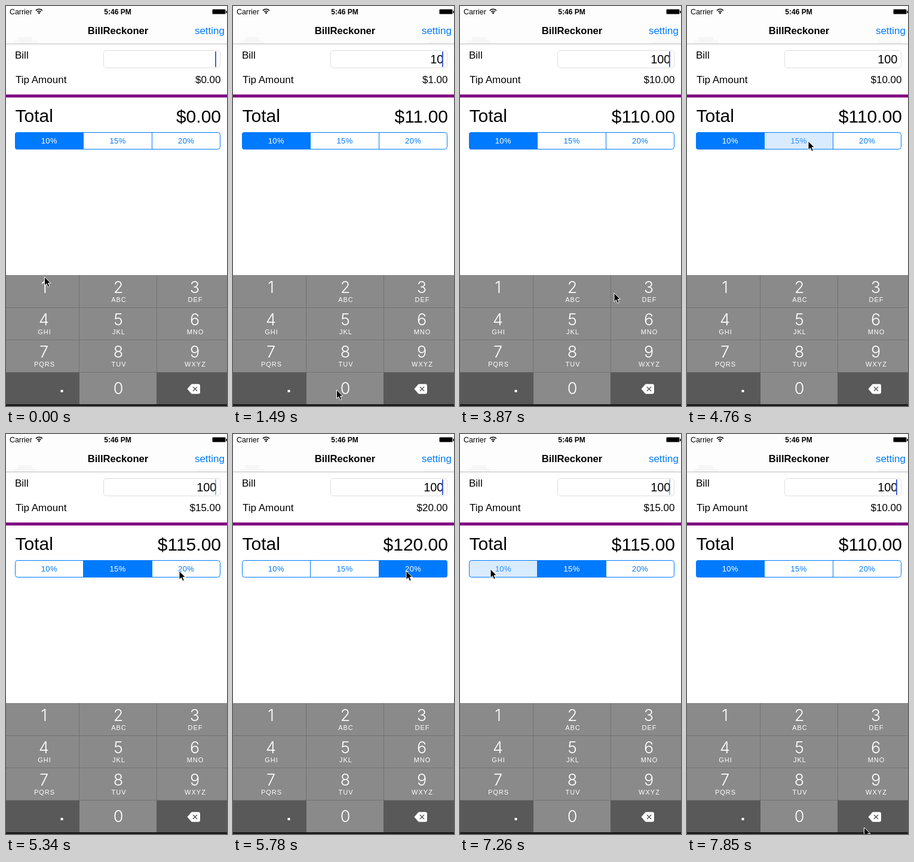
Write an HTML page that moves like this. It is 370 px wide and 669 px high and loops after 8 s.

```html
<!DOCTYPE html>
<html lang="en">
<head>
<meta charset="utf-8">
<title>Tip screen</title>
<style>
  html, body { margin: 0; width: 100%; height: 100%; overflow: hidden; background: #fff; }
  svg { display: block; width: 370px; height: 669px; }
  text { font-family: "Liberation Sans", Arial, sans-serif; font-size: 17px; }
  .mid { text-anchor: middle; }
  .end { text-anchor: end; }
  .big { font-size: 30px; }
  .bold { font-weight: bold; }
  .digit { font: 300 27px Inter, "Liberation Sans", sans-serif; fill: #fff; }
  .abc { font-size: 11px; letter-spacing: 1px; fill: #fff; }
  .seg { font-size: 13px; letter-spacing: .4px; }
</style>
</head>
<body>
<svg viewBox="0 0 370 669">
  <rect width="370" height="669" fill="#fff"/>
  <rect width="370" height="63" fill="#fdfdfd"/>
  <path d="M20 52h24v6h8v5H12v-5h8z" fill="#f6f6f6"/>
  <rect id="shade" y="59" height="4" fill="#f6f6f6"/>
  <path d="M0 63.5H370" stroke="#bcbcbc"/>

  <text x="6" y="13.5" style="font-size:12.4px">Carrier</text>
  <path d="M49.9 7.6a7.8 7.8 0 0 1 11 0M52.2 9.9a4.6 4.6 0 0 1 6.4 0" fill="none" stroke="#000" stroke-width="1.5"/>
  <path d="M55.4 13.6l-1.9-2.1a2.7 2.7 0 0 1 3.8 0z"/>
  <text class="mid bold" x="187" y="13.5" style="font-size:12px">5:46 PM</text>
  <rect x="345.5" y="5.5" width="22" height="8" rx="1.5" stroke="#888"/>
  <rect x="368.5" y="8" width="1.5" height="4"/>

  <text class="mid bold" x="187.5" y="47" style="font-size:16.6px">BillReckoner</text>
  <text class="end" x="366" y="47" fill="#007aff">setting</text>

  <text x="15" y="88">Bill</text>
  <rect x="163.5" y="74.5" width="195" height="29" rx="4.5" fill="#fff" stroke="#dedede"/>
  <text id="bill" class="end" x="352.5" y="96" style="font-size:20px"></text>
  <rect id="caret" x="350" y="76" width="2" height="26" fill="#4260e8"/>
  <text x="16" y="129">Tip Amount</text>
  <text id="tip" class="end" x="359.5" y="129"></text>
  <rect y="148" width="370" height="5" fill="#800080"/>
  <text class="big" x="15.5" y="194">Total</text>
  <text id="total" class="end big" x="360" y="195"></text>

  <clipPath id="round"><rect x="15" y="211" width="344" height="29" rx="4"/></clipPath>
  <g id="segs" clip-path="url(#round)"></g>
  <path d="M129.5 211V240M244.5 211V240" stroke="#007aff"/>
  <rect x="15.5" y="211.5" width="343" height="28" rx="4" fill="none" stroke="#007aff"/>
  <g id="labels"></g>

  <rect y="450" width="370" height="219" fill="#8a8a8a"/>
  <path d="M0 612H123V666H0zM252 612H370V666H252z" fill="#595959"/>
  <rect id="zero" x="123" y="612" width="129" height="54"/>
  <path d="M0 504.5H370M0 558.5H370M0 612.5H370M122.5 450V612M252.5 450V612" stroke="#727272"/>
  <rect y="666" width="370" height="3" fill="#1c1c1c"/>
  <g id="keys"></g>
  <rect x="91.5" y="642" width="4" height="4" fill="#fff"/>
  <path d="M303.5 640.5l6-7q1-1.2 2.5-1.2h10q3 0 3 3v10.5q0 3-3 3h-10q-1.5 0-2.5-1.2z" fill="#fff"/>
  <path d="M313 637l7 7m0-7l-7 7" stroke="#595959" stroke-width="1.5"/>

  <path id="mouse" d="M0 0V14.5L3.4 11.4L5.8 16.8L8.4 15.700L6 10.4H10.3z" stroke="#fff"/>
</svg>
<script>
const LOOP = 8000, STEP = 148.1;
const LAST = Math.floor(LOOP / STEP) - 1;
const BLINK = 6.6, BLINK_LEAD = .65;   // in steps
const $ = id => document.getElementById(id);

function set(el, attrs) {
  for (const name in attrs) el.setAttribute(name, attrs[name]);
  return el;
}

function add(parent, tag, attrs, text = '') {
  const el = set(document.createElementNS('http://www.w3.org/2000/svg', tag), attrs);
  el.textContent = text;
  $(parent).append(el);
  return el;
}

const columns = [63.5, 188, 316];
' ,ABC,DEF,GHI,JKL,MNO,PQRS,TUV,WXYZ'.split(',').forEach((letters, i) => {
  const x = columns[i % 3], y = 480 + 54 * Math.floor(i / 3);
  add('keys', 'text', { class: 'mid digit', x, y }, i + 1);
  add('keys', 'text', { class: 'mid abc', x: x + 1, y: y + 15 }, letters);
});
add('keys', 'text', { class: 'mid digit', x: columns[1], y: 649 }, 0);

const rates = [10, 15, 20];
const width = 344 / 3;
const segs = rates.map((rate, i) => {
  const x = 15 + width * i;
  return {
    fill: add('segs', 'rect', { x, y: 211, width, height: 29, fill: '#007aff' }),
    label: add('labels', 'text', { class: 'mid seg', x: x + width / 2, y: 230 }, rate + '%')
  };
});

// Steps at which each digit of the bill appears
const strokes = [3, 10, 13];
const picks = [
  { at: 0, seg: 0 }, { at: 33, seg: 1 }, { at: 38, seg: 2 }, { at: 44, seg: 1 }, { at: 50, seg: 0 }
];
const start = [64.5, 453];
const moves = [
  { from: 3, to: 7, end: [173.5, 642] },
  { from: 15, to: 18, end: [308.5, 633] },
  { from: 25, to: 26, end: [258, 480] },
  { from: 26, to: 30, end: [203, 226] },
  { from: 34, to: 36, end: [290, 229] },
  { from: 41, to: 43, end: [184, 217] },
  { from: 44, to: 47, end: [51, 226] },
  { from: 50, to: 53, end: [296.5, 658] }
];

const clamp = u => Math.max(0, Math.min(1, u));
const smooth = u => u * u * (3 - 2 * u);

function mousePos(k) {
  return moves.reduce((pos, { from, to, end }) => {
    const u = smooth(clamp((k - from) / (to - from)));
    return pos.map((p, i) => p + (end[i] - p) * u);
  }, start);
}

function segLevel(i, k) {
  const n = picks.findLastIndex(p => p.at <= k);
  const now = picks[n], before = picks[n - 1], next = picks[n + 1];
  const fading = before && k === now.at;
  if (i === now.seg) return fading ? .62 : 1;
  if (fading && i === before.seg) return .5;
  return next && k === next.at - 1 && i === next.seg ? .15 : 0;
}

function caretLevel(k, typedAt) {
  const phase = (k - typedAt + BLINK_LEAD) % BLINK;
  return phase < 3.3 ? 1 : phase < 4.2 ? .5 : 0;
}

function draw(k) {
  const typed = strokes.filter(s => s <= k);
  const bill = '100'.slice(0, typed.length);
  const rate = rates[picks.findLast(p => p.at <= k).seg];
  const tip = bill * rate / 100;
  $('bill').textContent = bill;
  $('tip').textContent = '$' + tip.toFixed(2);
  $('total').textContent = '$' + (+bill + tip).toFixed(2);

  const caret = caretLevel(k, typed.at(-1) ?? 0);
  set($('caret'), { opacity: caret });
  const left = 344 - 8 * bill.length;
  set($('shade'), { x: left, width: bill ? (caret === 1 ? 368 : 360) - left : 0 });

  segs.forEach(({ fill, label }, i) => {
    const level = segLevel(i, k);
    set(fill, { opacity: level });
    set(label, { fill: `rgb(${255 * level},${122 + 133 * level},255)` });
  });
  set($('zero'), { fill: k === strokes[2] - 1 ? '#595959' : '#8a8a8a' });
  set($('mouse'), { transform: `translate(${mousePos(k)})` });
}

function tick() {
  draw(Math.min(LAST, Math.floor(performance.now() % LOOP / STEP)));
  requestAnimationFrame(tick);
}
tick();
</script>
</body>
</html>
```
